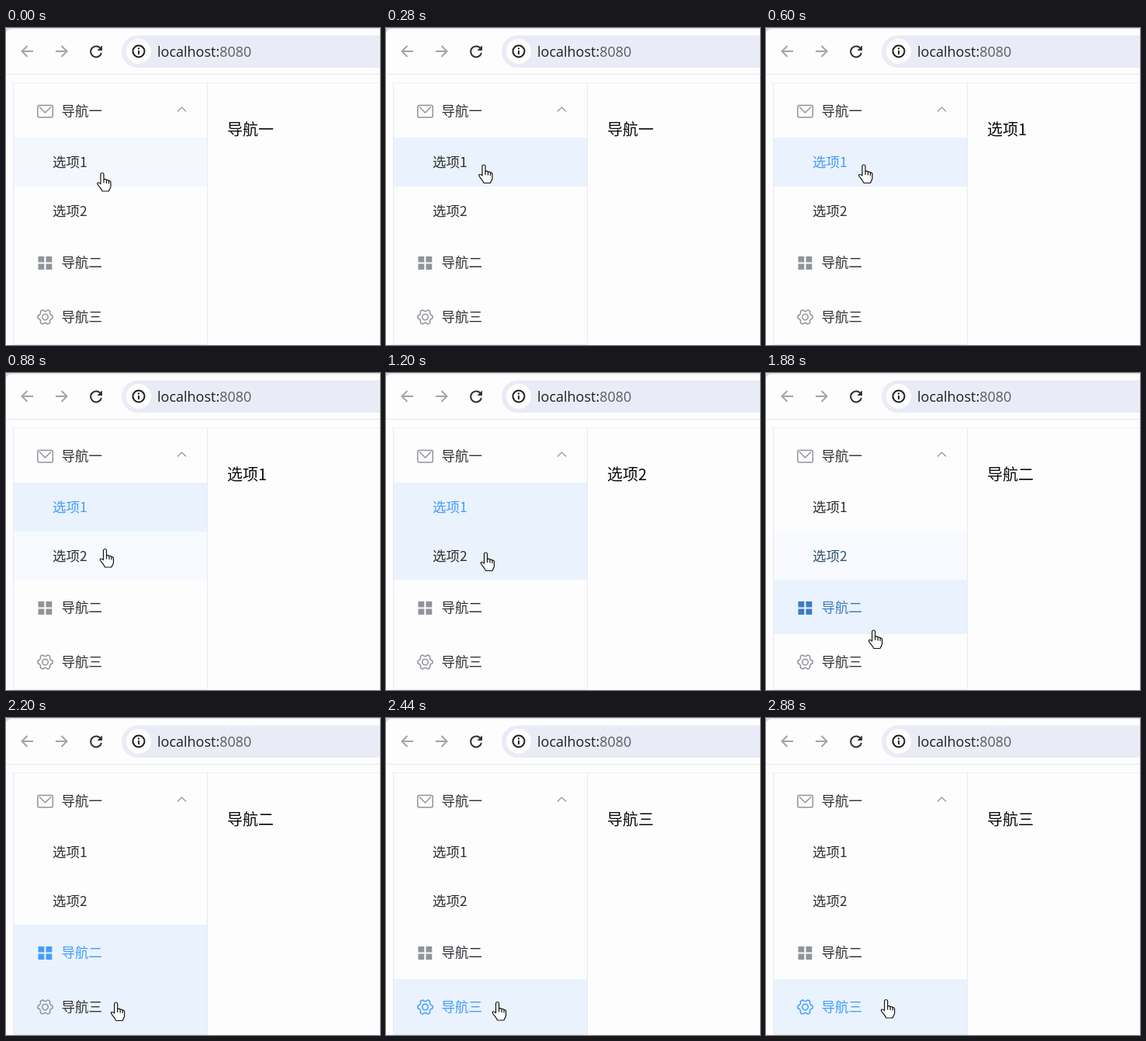
An HTML page for the animation above (2.92 s loop, 482 by 408 pixels).

```html
<!DOCTYPE html>
<html lang="zh-CN">
<head>
<meta charset="utf-8">
<style>
  html, body { margin: 0; height: 100%; overflow: hidden; background: #fdfdfe; }
  svg { display: block; }
  text { font: 17.5px "Noto Sans CJK SC", "Noto Sans CJK", sans-serif; fill: #303133; }
  #title { font-size: 20px; fill: #080808; }
  .url { font: 18px "Open Sans", "Noto Sans", sans-serif; fill: #1f1f1f; }
  .line { fill: none; stroke-width: 1.5; }
  .bold { stroke-width: 2; }
</style>
</head>
<body>
<svg width="482" height="408" viewBox="0 0 482 408">
  <path d="M0 0H482V1.2H8Q2 1.2 0 6Z" fill="#d8dade"/>
  <path d="M0 59.5H482" stroke="#e8e9ee"/>
  <g class="line bold">
    <path d="M35 30H21M27.5 23L20.5 30L27.5 37M64 30H78M71.5 23L78.5 30L71.5 37" stroke="#a2a3a8"/>
    <path d="M122 26.5A7 7 0 1 0 123 32" stroke="#303133"/>
  </g>
  <path d="M124 22.5V29H117.5Z" fill="#303133"/>
  <rect x="149" y="9.500" width="360" height="41.500" rx="20.700" fill="#e9ecf7"/>
  <circle cx="171" cy="30" r="16" fill="#fdfdfe"/>
  <circle cx="171" cy="30" r="7.500" class="line bold" stroke="#1f1f1f"/>
  <path d="M171 29V34M171 25.5V27.5" stroke="#1f1f1f" stroke-width="2"/>
  <text class="url" x="195" y="36.500">localhost:<tspan fill="#5a5c62">8080</tspan></text>

  <g id="rows"></g>
  <path d="M9 70.5H482" stroke="#efeff0"/>
  <path d="M9.5 70V407.5H259.5V70" fill="none" stroke="#e9e9f2"/>

  <g class="line" stroke="#909399">
    <rect x="40.800" y="99.500" width="19.500" height="15.500" rx="2"/>
    <path d="M43 101.5L50.5 109L58 101.5"/>
    <path d="M221 107.5L226.5 102L232 107.5" stroke-width="1.2"/>
  </g>
  <text x="71.500" y="113">导航一</text>
  <g id="items"></g>
  <text id="title" x="285" y="138"></text>
  <path id="hand" fill="#fff" stroke="#111" stroke-width="1.2" stroke-linejoin="round"
    d="M-2 2A2 2 0 0 1 2 2V9A1.9 1.9 0 0 1 5.5 9.5A1.8 1.8 0 0 1 8.5 10.5A1.6 1.6 0 0 1 11 12V17C11 20 9 21 8.5 23.5H0C-.5 21 -4 18 -6 14.5C-7 12.5 -4.5 11.5 -2 14ZM2 9V13M5.5 9.5V13.5M8.5 10.5V14"/>
</svg>
<script>
const LOOP = 2920, STEP = 40, FADE = 180;
const DARK = [48, 49, 51], BLUE = [64, 158, 255], GREY = '#909399';
const $ = id => document.getElementById(id);

function add(parent, tag, attrs, text = '') {
  const el = document.createElementNS('http://www.w3.org/2000/svg', tag);
  for (const key in attrs) el.setAttribute(key, attrs[key]);
  el.textContent = text;
  return parent.appendChild(el);
}

const gridIcon = [41.5, 51.5].map(x => [294, 303.5].map(y => `M${x} ${y}h7.8v7.5h-7.8z`).join('')).join('');
const gearIcon = 'M' + Array.from({ length: 72 }, (_, i) => {
  const a = i * Math.PI / 36, r = 8.6 + 1.1 * Math.tanh(2 * Math.cos(6 * a));
  return `${(50.5 + r * Math.cos(a)).toFixed(2)} ${(372 + r * Math.sin(a)).toFixed(2)}`;
}).join('L') + 'ZM54.3 372a3.8 3.8 0 1 0 -7.6 0a3.8 3.8 0 1 0 7.6 0';

// lit / unlit: row background; pick / drop: selected colour
const items = [
  { label: '选项1', x: 60, y: 141, h: 63, lit: -50, unlit: 1200, pick: 440, drop: 1200 },
  { label: '选项2', x: 60, y: 204, h: 62, lit: 840, unlit: 1800, pick: 1200, drop: 1800 },
  { label: '导航二', x: 71.5, y: 266, h: 70, lit: 1480, unlit: 2280, pick: 1800, drop: 2280, icon: gridIcon },
  { label: '导航三', x: 71.5, y: 336, h: 71, lit: 1920, unlit: LOOP, pick: 2280, drop: LOOP, icon: gearIcon, outline: true },
];
for (const it of items) {
  it.row = add($('rows'), 'rect', { x: 10, y: it.y, width: 249, height: it.h, fill: '#eaf2fd' });
  it.text = add($('items'), 'text', { x: it.x, y: it.y + it.h / 2 + 6.6 }, it.label);
  if (it.icon) it.mark = add($('items'), 'path', { d: it.icon, class: it.outline ? 'line' : '' });
}

// time, x, y of the fingertip
const path = [
  [0, 124, 186.5], [240, 126, 176], [600, 126, 176], [800, 127, 204], [880, 127.5, 226.5],
  [1080, 128.5, 231], [1200, 128.5, 231], [1480, 137, 266], [1520, 138.7, 286.5], [1720, 139, 307],
  [1800, 139, 307], [1880, 138.7, 331], [2080, 141, 361], [2200, 141.7, 366], [2400, 141.7, 366],
  [2680, 154.7, 362.5], [LOOP, 154.7, 362.5],
];

const ease = p => 1 - (1 - Math.min(1, Math.max(0, p))) ** 2;
const level = (t, on, off) => ease((t - on) / FADE) - ease((t - off) / FADE);
const mix = (a, b, k) => `rgb(${a.map((v, i) => Math.round(v + (b[i] - v) * k))})`;

function handAt(t) {
  const i = path.findIndex(p => p[0] > t);
  const [t0, x0, y0] = path[i - 1], [t1, x1, y1] = path[i];
  const k = (t - t0) / (t1 - t0);
  return `translate(${x0 + (x1 - x0) * k} ${y0 + (y1 - y0) * k})`;
}

function draw(now) {
  const t = Math.floor(now % LOOP / STEP) * STEP;
  let title = '导航一';
  for (const it of items) {
    const color = mix(DARK, BLUE, level(t, it.pick, it.drop));
    const selected = t >= it.pick && t < it.drop;
    if (t >= it.pick) title = it.label;
    it.row.style.opacity = level(t, it.lit, it.unlit);
    it.text.style.fill = color;
    if (it.mark) it.mark.style[it.outline ? 'stroke' : 'fill'] = selected ? color : GREY;
  }
  $('title').textContent = title;
  $('hand').setAttribute('transform', handAt(t));
}

const start = performance.now();
function tick() {
  draw(performance.now() - start);
  requestAnimationFrame(tick);
}
tick();
</script>
</body>
</html>
```
